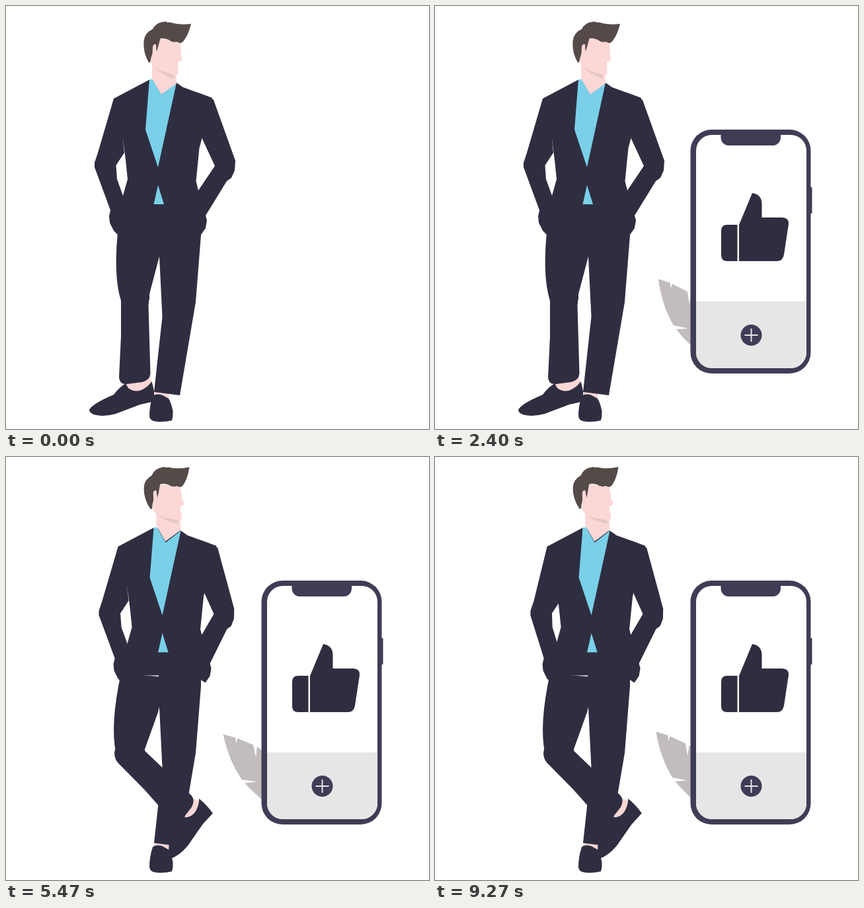
Write an HTML page with a canvas that moves like this. It is 640x640 px and loops after 9330 ms.

```html
<!DOCTYPE html>
<html lang="en">
<head>
<meta charset="utf-8">
<style>
html, body { margin: 0; width: 100%; height: 100%; overflow: hidden; background: #fff; }
canvas { display: block; width: 100vmin; height: 100vmin; }
</style>
</head>
<body>
<canvas id="stage" width="640" height="640"></canvas>
<script>
const ctx = document.getElementById('stage').getContext('2d');
const LOOP = 9330;
const SUIT = '#2f2e41', SKIN = '#fbd7d6', HAIR = '#544b49', SHIRT = '#7ad0e9';
const CASE = '#3f3d56', PANEL = '#e6e6e6', FEATHER = '#c2bcbc', SHADE = '#e3c8c6';

const span = (t, start, length) => Math.min(1, Math.max(0, (t - start) / length));
const outQuad = x => 1 - (1 - x) * (1 - x);
const outSine = x => Math.sin(x * Math.PI / 2);
const inOutSine = x => (1 - Math.cos(x * Math.PI)) / 2;
const hump = x => Math.sin(x * Math.PI);

// Swings between [time, value] turning points.
function swing(turns, t) {
  let value = turns[0][1];
  for (let i = 1; i < turns.length; i++) {
    const [t0, a] = turns[i - 1], [t1, b] = turns[i];
    value += (b - a) * inOutSine(span(t, t0, t1 - t0));
  }
  return value;
}

// Scale of an element popping in: overshoot, undershoot, rest.
const pop = ms => 1.14 * outSine(span(ms, 0, 380))
  - 0.19 * inOutSine(span(ms, 380, 330)) + 0.05 * inOutSine(span(ms, 710, 220));

// Tilt of the feather in degrees.
const featherTurns = [[1700, 1.4], [4550, -9], [6200, -1], [7650, -11.7], [9700, -0.5]];

const torso = new Path2D('M216 112L163 140L177 202L181 233L184 262L177 287L160 310L166 335H296L302 317L291 279L287.5 265L290 240L292.5 215L296.5 200L312 139L268 123L258 116Z');
const shirt = new Path2D('M217 111H222L235 134L258 116L230 244L211 187ZM230 271L223.5 300H239Z');
const neck = new Path2D('M221 82V110L235 134L258 117L257 90Z');
const face = new Path2D('M232 46L264 55L265 68L264.5 72L266.5 82L260 85L260.5 104L248 102Q228 97 222 89L218 82L222 60Z');
const jawShade = new Path2D('M222 89Q230 98 254 104V110Q232 103 222 89Z');
const hair = new Path2D('M216 85.5Q207 70 208.5 53Q210 40 222 35Q227 25 238 24L244 23.5L243 25Q248 24 253 26Q265 29 280 27Q276 43 270 51Q267 56 263 56L258 54Q252 56 246 51Q239 48 233.5 49Q231 59 228 69Q227 64 227 58Q223 57 222 62L221.5 72L219 80Q219 86 216 85.5Z');
const thigh = new Path2D('M171 325Q161 405 174 446L195 456L217 444V436L232 379L240 325Z');
const ankle = new Path2D('M180 568L218 562L221 570Q209 584 196 583Q184 582 180 568Z');
const backShoe = new Path2D('M220.5 568Q225 582 225 598L203 603L166 617Q148 622 134 618.5Q126 616 126 611Q130 602 163 588Q171 577 181 571L185 578Q196 586 207 580Q216 575 220.5 568Z');
const shin = new Path2D('M174 444L174 500L171 562Q172 573 183 572L206 569Q218 566 218.5 556L215.5 453L216.5 444A21 21 0 0 0 174 444Z');
const frontAnkle = new Path2D('M224 580H247L246 596H224Z');
const frontShoe = new Path2D('M222 590Q227 586 236 588.5L246 594Q250 600 252.5 613Q253 621 251 627Q240 630 226 628.5Q217 627 217 620Q217 605 222 590Z');
const frontLeg = new Path2D('M231 325H295V347L287 448L263 589L224 584L236.5 470L232 379Z');
const feather = new Path2D('M338 413L356 419L356.5 428L359 420.5L382 432L385 451L387.5 435L415 460L425 542L404 528Q383 512 365 489L383 488L361 483Q344 455 338 413Z');
const wrist = new Path2D('M457.5 331H442Q433 331 433 340V377Q433 386 442 386H457.5Z');
const hand = new Path2D('M460 331L480 283Q494 285 494.5 299V320H526Q536 321 535 330L528 376Q526.5 386 517 386H460Z');
const leftArm = '163,140 139,222 134,237 134,244 158,309 156,318 157,328 163,340 169,346 190,330 177,287 168,262 166.5,241 179,222 177,202 195,150';
const rightArm = '290,131 308,138 314,142 347,234 346,249 341,260 334,265 302,317 304,324 302,336 295,346 270,330 291,279 316,242 296.5,200';

function fill(path, color) {
  ctx.fillStyle = color;
  ctx.fill(path);
}

function box(x, y, w, h, radius, color) {
  const path = new Path2D();
  path.roundRect(x, y, w, h, radius);
  fill(path, color);
}

// An arm keeps its shoulder and hand while the elbow moves sideways.
function drawArm(outline, bend) {
  ctx.beginPath();
  for (const point of outline.split(' ')) {
    const [x, y] = point.split(',').map(Number);
    ctx.lineTo(x + bend * hump(span(y, 140, 170)), y);
  }
  ctx.fillStyle = SUIT;
  ctx.fill();
}

// Run a drawing with scale and rotation (degrees) about a pivot, then a shift.
function around(x, y, scale, degrees, draw, dx = 0, dy = 0) {
  if (scale <= 0) return;
  ctx.save();
  ctx.translate(x + dx, y + dy);
  ctx.rotate(degrees * Math.PI / 180);
  ctx.scale(scale, scale);
  ctx.translate(-x, -y);
  draw();
  ctx.restore();
}

function drawPhone() {
  box(566, 274, 4.5, 40, 1, CASE);
  box(386.5, 187, 182, 369, 32, CASE);
  box(395, 195, 167, 353, 24, '#fff');
  box(395, 447, 167, 101, [0, 0, 24, 24], PANEL);
  box(432.5, 190, 90.5, 21, [0, 0, 12, 12], CASE);
  box(462.5, 482, 32, 32, 16, CASE);
  box(468.5, 497, 20, 2, 0, PANEL);
  box(477.5, 488, 2, 20, 0, PANEL);
}

function drawLegs(step) {
  around(215, 340, 1, 5 * step, () => {
    fill(thigh, SUIT);
    around(195, 447, 1, -49.5 * step, () => {
      fill(ankle, SKIN);
      around(224, 585, 1, 10 * step, () => fill(backShoe, SUIT));
      fill(shin, SUIT);
    });
  }, 1.5 * step, 6 * step);
  fill(frontAnkle, SKIN);
  fill(frontShoe, SUIT);
  fill(frontLeg, SUIT);
}

function drawMan(t) {
  const lean = outQuad(span(t, 2400, 3280));
  const step = outSine(span(t, 2430, 1300));
  const sway = hump(span(t, 2400, 3070));
  const drift = inOutSine(span(t, 5600, 3100));

  drawLegs(step);
  around(0, 0, 1, 0, () => {
    fill(torso, SUIT);
    drawArm(leftArm, 5.5 * sway + 4 * drift);
    drawArm(rightArm, -8.5 * lean - 3.5 * sway);
    fill(shirt, SHIRT);
  }, 6.6 * lean, -4.5 * lean);
  around(0, 0, 1, 0, () => fill(neck, SKIN), 6.3 * lean, -6.3 * lean);
  around(240, 112, 1, -8 * step, () => {
    fill(jawShade, SHADE);
    fill(face, SKIN);
  }, 7.5 * lean, -7 * lean);
  around(240, 112, 1, -4.9 * step, () => fill(hair, HAIR), 5 * lean, -8.8 * lean);
}

function render(t) {
  box(0, 0, 640, 640, 0, '#fff');
  around(425, 542, outQuad(span(t, 1300, 600)), swing(featherTurns, t), () => fill(feather, FEATHER));
  around(478, 371.5, pop(t - 70), 0, drawPhone);
  around(433, 386, pop(t - 1000), 38 * (1 - outQuad(span(t, 1000, 600))), () => {
    fill(wrist, SUIT);
    fill(hand, SUIT);
  });
  drawMan(t);
}

const begin = performance.now();
function tick() {
  render((performance.now() - begin) % LOOP);
  requestAnimationFrame(tick);
}
tick();
</script>
</body>
</html>
```
